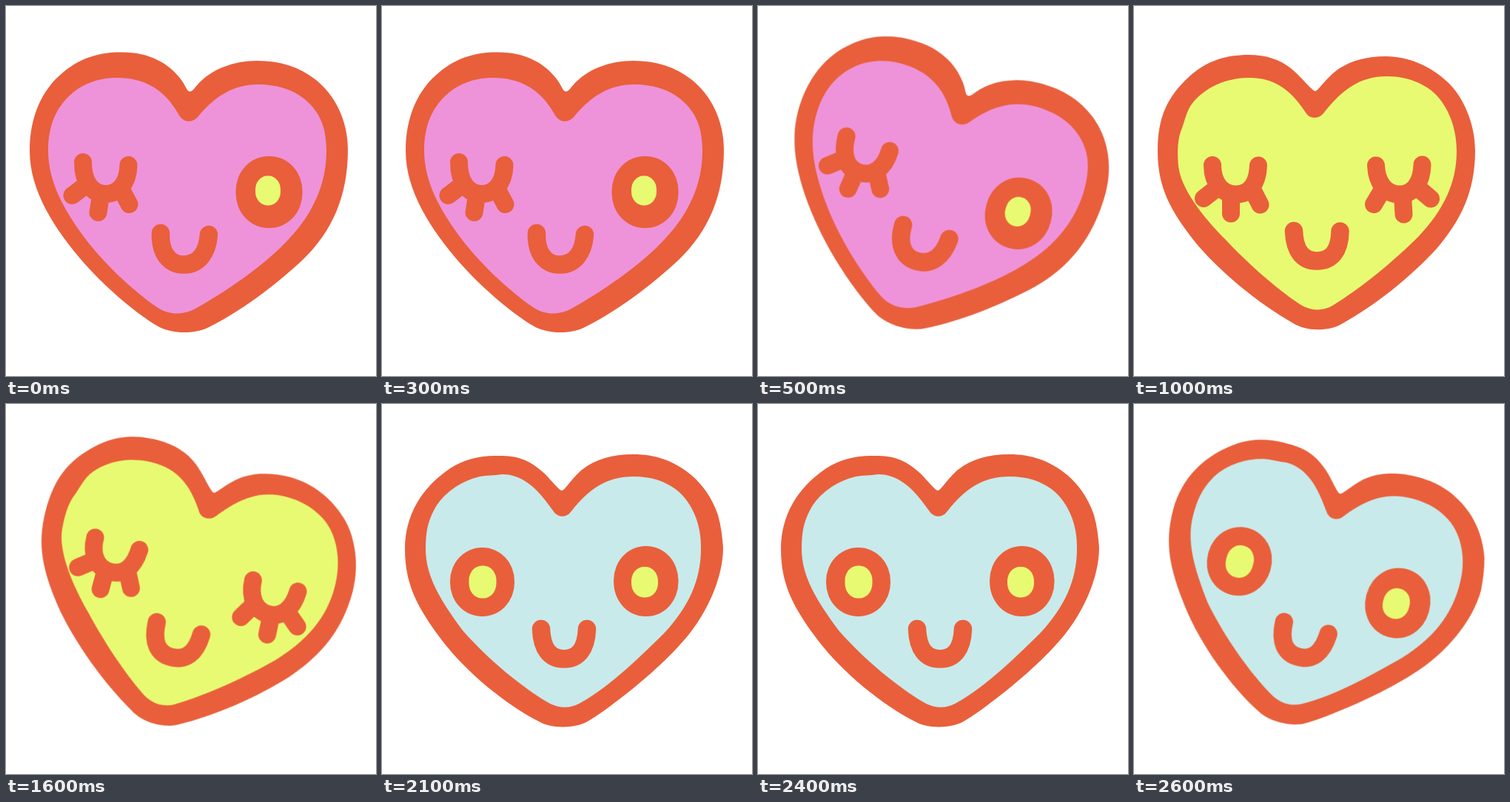
These frames come from a looping animation (500 by 500 pixels, 3.1 s). An HTML page:

```html
<!DOCTYPE html>
<html lang="en">
<head>
<meta charset="utf-8">
<title>Winking heart</title>
<style>
  html, body { margin: 0; width: 100%; height: 100%; overflow: hidden; background: #fff; }
  svg { display: block; width: 100vw; height: 100vh; }

  .edge, .eye { fill: #e95f3b; }
  .pupil { fill: #e7fa71; }
  .line { fill: none; stroke: #e95f3b; stroke-width: 24; stroke-linecap: round; stroke-linejoin: round; }
  .smile { stroke-width: 24.5; }
  .pink { fill: #ee93d9; }
  .lime { fill: #e7fa71; }
  .blue { fill: #c8eaeb; }

  /* Each mood shows upright, then tilted; all changes are hard cuts. */
  #tilt { animation: tilt 3100ms step-end infinite; }
  .mood { visibility: hidden; animation: 3100ms step-end infinite; }
  #wink { animation-name: wink; }
  #sleep { animation-name: sleep; }
  #awake { animation-name: awake; }

  @keyframes tilt {
    0%, 32.258%, 67.7419% { transform: none; }
    16.129%, 51.6129%, 83.8709% { transform: matrix(.966, .259, -.259, .966, 73.8, -54.7); }
    100% { transform: none; }
  }
  @keyframes wink {
    0% { visibility: visible; }
    32.258%, 100% { visibility: hidden; }
  }
  @keyframes sleep {
    0%, 67.7419%, 100% { visibility: hidden; }
    32.258% { visibility: visible; }
  }
  @keyframes awake {
    0% { visibility: hidden; }
    67.7419%, 100% { visibility: visible; }
  }
</style>
</head>
<body>
<svg viewBox="0 0 500 500">
  <g id="tilt">
    <g id="wink" class="mood">
      <path class="edge" d="M248 115.5C244 115 243 108 237 100C221 78 194 62 155 62.5C126 62.5 101 70 78 89C48 113 32 150 32 196C32 250 66 302 106 348C140 386 180 418 204 432C222 443 252 444 272 435C312 416 364 378 402 342C440 305 462 258 462 194C462 154 444 120 419 100C396 82 370 74 340 74C306 74 280 86 264 101C256 108 253 116 248 115.5Z"/>
      <path class="pink" d="M233 146C214 112 186 97 150 97C127 97 104 104 86 121C66 140 57 164 57 196C57 235 76 270 98 302C128 345 172 385 204 407C220 418 240 418 256 409C300 384 350 350 383 314C415 280 433 240 433 196C433 164 424 144 406 128C388 112 364 106 340 106C308 106 282 122 260 149C252 159 239 158 233 146Z"/>
      <path class="line" d="M104 211C104 239 117 254 134 254C152 254 165 240 165.500 215M89.500 256L108 242M124.500 279L128 256M166.500 268L156 248"/>
      <rect class="eye" x="310.500" y="203" width="90" height="97" rx="44" ry="47"/>
      <rect class="pupil" x="337" y="229.500" width="34" height="40" rx="16" ry="18.500"/>
      <path class="line smile" d="M209 307C208 334 221 349.500 240 349.500C260 349.500 272 334 274 309"/>
    </g>

    <g id="sleep" class="mood">
      <path class="edge" d="M245 115C241 115 226 96 213 85C197 72 178 66 155 66C124 66 98 74 74 96C45 123 32 150 32 196C32 246 50 277 81 317C115 359 170 403 214 428C232 440 262 440 280 430C324 406 372 368 408 329C442 290 461 250 461 196C461 160 446 124 424 103C402 82 372 68 340 68C316 68 296 73 278 84C260 96 249 115 245 115Z"/>
      <path class="lime" d="M232 144C210 110 186 96 153 97C124 98 98 109 80 130C70 142 69 156 63 170C58 184 59 204 60 216C63 246 92 284 124 316C152 346 190 380 224 403C238 412 254 413 268 405C306 382 352 344 384 312C418 276 436 240 436 196C436 166 426 140 410 122C396 106 370 95 342 95C306 95 282 112 256 145C250 153 237 153 232 144Z"/>
      <path class="line" d="M106 215C106 239 119 254.500 138 254.500C156 254.500 167 240 168 215.500M94 260L112 246M131 280.500L131 256M170.500 268.500L160 248"/>
      <path class="line" d="M327 215.500C328 240 341 254.500 359 254.500C377 254.500 389 239 389.500 214.500M324 268L336 248M364.500 281.500L363 256M401 260.500L384 246"/>
      <path class="line smile" d="M216 304C217 331 228 344.500 247 344.500C267 344.500 278 331 278.500 304.500"/>
    </g>

    <g id="awake" class="mood">
      <path class="edge" d="M243 117C239 117 228 101 215 90C194 72 178 70 155 70C134 69.500 112 74 92 87C52 114 31 152 31 196C31 244 48 275 80 318C113 362 168 407 214 430C228 438 258 439 276 430C306 413 370 362 402 326C438 288 461 236 461 194C460 180 458 164 454 150C446 126 432 108 418 96C394 76 368 68 340 68C310 68 288 75 270 89C256 101 247 117 243 117Z"/>
      <path class="blue" d="M231 144C214 120 194 95 162 95C152 97 142 96 132 98C104 105 82 122 71 142C61 160 59 176 59 196C59 232 78 264 109 306C144 346 190 383 222 402C238 412 254 412 268 404C308 382 346 344 381 310C414 275 431 238 431 196C432 164 420 134 398 116C382 104 364 98 340 98C304 98 280 114 255 146C249 154 237 154 231 144Z"/>
      <rect class="eye" x="92" y="194" width="87" height="93" rx="43" ry="45.500"/>
      <rect class="pupil" x="117.500" y="218.500" width="37" height="44" rx="17.500" ry="20"/>
      <rect class="eye" x="313" y="192" width="87.500" height="95" rx="43" ry="46.500"/>
      <rect class="pupil" x="337" y="220" width="36" height="41.500" rx="17" ry="19"/>
      <path class="line smile" d="M215 304C216 331 227 344.500 246 344.500C265 344.500 276 331 277 304"/>
    </g>
  </g>
</svg>
</body>
</html>
```
